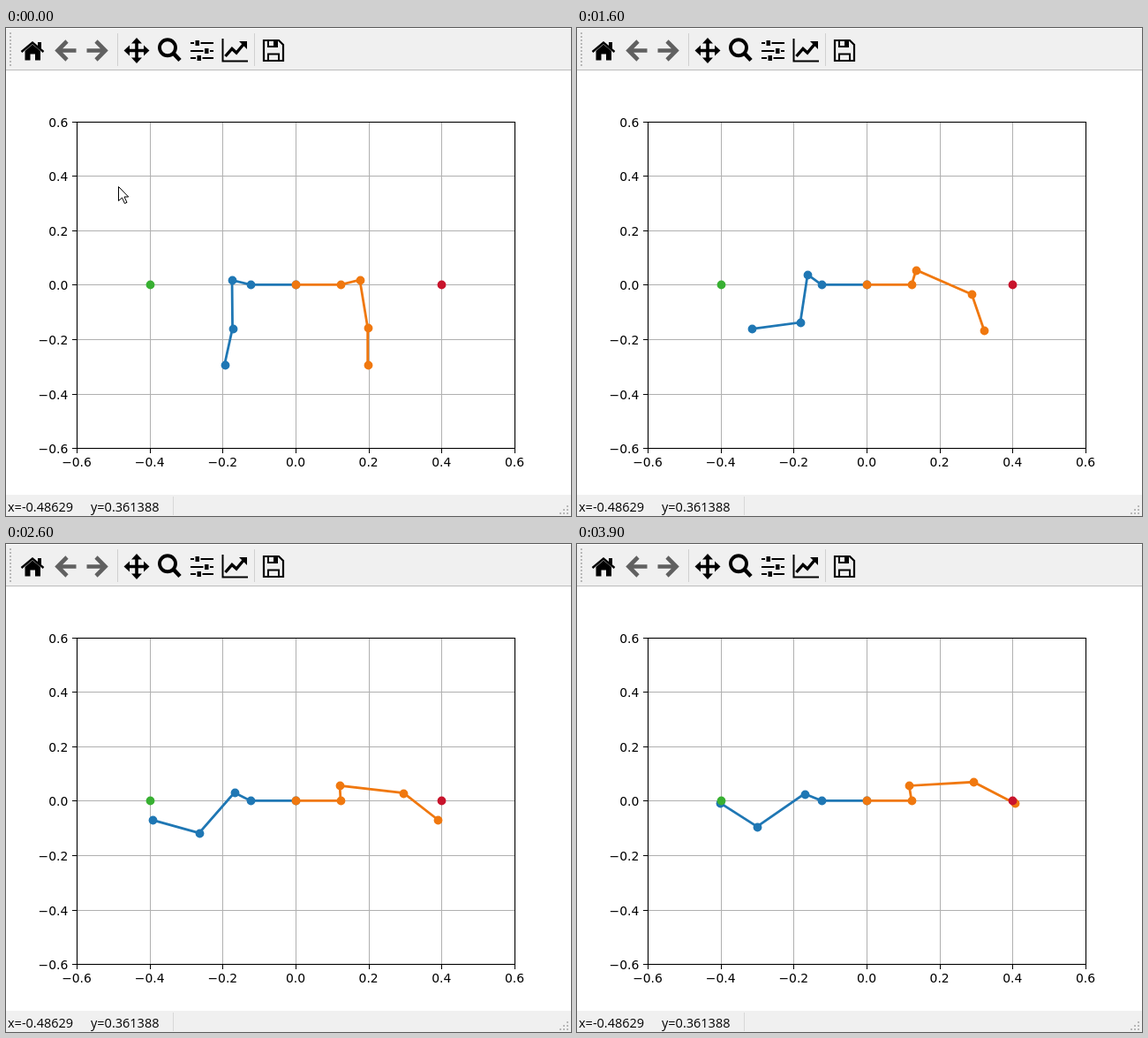
An HTML page with a canvas that plays this animation: 640x552 px, repeating every 4 s.

```html
<!DOCTYPE html>
<html lang="en">
<head>
<meta charset="utf-8">
<title>Two-leg reach plot</title>
<style>
  html, body { margin: 0; width: 640px; height: 552px; overflow: hidden; background: #fff; }
  canvas { display: block; }
</style>
</head>
<body>
<canvas id="stage" width="640" height="552"></canvas>
<script>
const ctx = document.getElementById('stage').getContext('2d');
const LOOP = 4, STEP = 0.1; // seconds
const BLUE = '#1f77b4', ORANGE = '#f0780f', GREEN = '#38b032', RED = '#c8142c';
const X = v => 328 + v * 413.33;
const Y = v => 290.4 - v * 308;

// Progress from 0 to 1: a power ease-out, and a smooth swing between two times.
const settle = (t, power, end = LOOP) => 1 - Math.max(0, 1 - t / end) ** power;
const swing = (t, start, end) => {
  const u = Math.min(1, Math.max(0, (t - start) / (end - start)));
  return u * u * (3 - 2 * u);
};

// Absolute link angles in degrees, from the hip outwards.
const legs = [
  { color: BLUE, hip: -0.1235, links: [0.0533, 0.177, 0.135], pose(t) {
    const lift = swing(t, 1, 3.5);
    return [161.6 - 28.6 * settle(t, 2, 1) + 18.5 * lift, 270.4 - 47.5 * lift, 260.7 - 121.5 * settle(t, 1.7)];
  } },
  { color: ORANGE, hip: 0.1235, links: [0.0555, 0.177, 0.1365], pose: t =>
    [18.6 + 78.5 * settle(t, 2.7), -83 + 87.5 * settle(t, 1.8), -90 + 55.4 * swing(t, 0.7, 3.4)] }
];

function rect(color, x, y, w, h) {
  ctx.fillStyle = color;
  ctx.fillRect(x, y, w, h);
}

function shape(d, fill, stroke, width = 1) {
  const path = new Path2D(d);
  if (fill) { ctx.fillStyle = fill; ctx.fill(path); }
  if (stroke) { ctx.strokeStyle = stroke; ctx.lineWidth = width; ctx.stroke(path); }
}

// Markers sit on whole pixels.
function dot(color, x, y) {
  ctx.fillStyle = color;
  ctx.beginPath();
  ctx.arc(Math.round(x) + 0.5, Math.round(y) + 0.5, 4.9, 0, 7);
  ctx.fill();
}

function text(str, x, y, font, align = 'left') {
  ctx.font = font;
  ctx.textAlign = align;
  ctx.fillStyle = '#000';
  ctx.fillText(str, x, y);
}

function drawSlider(y, knob) {
  rect('#000', 209, y - 1, 26, 2);
  rect('#f0f0f0', knob - 1.5, y - 3, 7.5, 6);
  rect('#000', knob, y - 3, 4.5, 6);
}

function drawToolbar() {
  rect('#f0f0f0', 0, 1, 640, 46);
  rect('#bcbcbc', 0, 47, 640, 1);
  for (let y = 5; y < 44; y += 4) rect('#b8b8b8', 4, y, 2, 2);
  for (const x of [126, 281]) rect('#d0d0d0', x, 6, 1, 37);

  // home
  shape('M30 18.5L39 26V36.5H33V29.5H27.5V36.5H21.5V26Z', '#000');
  shape('M17.5 27L30 16.5L42.5 27', null, '#000', 2.4);
  rect('#000', 36, 16, 4, 7);
  // back and forward
  shape('M58 25.5H79.5M69 15L58.5 25.5L69 36', null, '#606060', 4.6);
  shape('M91.5 25.5H113M102 15L112.5 25.5L102 36', null, '#606060', 4.6);
  // pan
  shape('M148 15V36M138 25.5H158', null, '#000', 3.6);
  shape('M148 11L154 17.5H142ZM148 40L142 33.5H154ZM133.5 25.5L140 19.5V31.5ZM162.5 25.5L156 19.5V31.5Z', '#000');
  // zoom
  shape('M192 22.3A9 9 0 1 1 174 22.3A9 9 0 1 1 192 22.3', null, '#000', 3.9);
  shape('M189.5 28.5L197 36.5', null, '#000', 4.6);
  // sliders
  drawSlider(17, 214.5);
  drawSlider(26, 225);
  drawSlider(34, 216.5);
  // chart
  shape('M245.5 12V37.5H274', null, '#000', 2);
  shape('M248.5 32L256 23.5L261 28L269 18.5', null, '#000', 3.4);
  shape('M264 15H273V24Z', '#000');
  // save
  shape('M292 14H309L314 19V37H292Z', null, '#000', 2.2);
  shape('M297 36.5V29.5H309V36.5M297 14V21H307V14', null, '#000', 2);
  rect('#000', 303, 14, 3, 6);
}

function drawStatus() {
  const font = '14.5px "Open Sans", sans-serif';
  rect('#f0f0f0', 0, 528, 640, 24);
  text('x=-0.48629', 2, 547, font);
  text('y=0.361388', 96, 547, font);
  rect('#d7d7d7', 189, 530, 1, 21);
  for (let row = 0; row < 3; row++)
    for (let col = 2 - row; col < 3; col++)
      rect('#b8b8b8', 627 + col * 4, 540 + row * 4, 2, 2);
}

function drawAxes() {
  const font = '13.9px "DejaVu Sans", sans-serif';
  for (let i = -3; i <= 3; i++) {
    const v = i / 5;
    const x = Math.round(X(v)), y = Math.round(Y(v));
    const label = v.toFixed(1).replace('-', '\u2212');
    if (Math.abs(i) < 3) {
      rect('#b0b0b0', x, 107, 1, 368);
      rect('#b0b0b0', 81, y, 495, 1);
    }
    rect('#000', x, 476, 1, 5);
    rect('#000', 75, y, 5, 1);
    text(label, X(v), 496, font, 'center');
    text(label, 70.3, Math.round(Y(v) + 6), font, 'right');
  }
  ctx.strokeStyle = '#000';
  ctx.lineWidth = 1.1;
  ctx.strokeRect(80.5, 106.5, 496, 369);
}

function drawLeg({ color, hip, links, pose }, t) {
  let x = hip, y = 0;
  const points = [[X(0), Y(0)], [X(hip), Y(0)]];
  pose(t).forEach((deg, i) => {
    const a = deg * Math.PI / 180;
    x += links[i] * Math.cos(a);
    y += links[i] * Math.sin(a);
    points.push([X(x), Y(y)]);
  });
  shape('M' + points.join('L'), null, color, 2.8);
  points.forEach(p => dot(color, ...p));
}

function frame(now) {
  const t = Math.floor(now / 1000 % LOOP / STEP) * STEP;
  rect('#fff', 0, 0, 640, 552);
  drawToolbar();
  drawAxes();
  legs.forEach(leg => drawLeg(leg, t));
  dot(GREEN, X(-0.4), Y(0));
  dot(RED, X(0.4), Y(0));
  drawStatus();
  if (t < STEP) shape('M127.5 179.5V195.5L131.5 192L134.5 198.5L137 197.3L134 191H138.7Z', '#fff', '#000');
  requestAnimationFrame(frame);
}
requestAnimationFrame(frame);
</script>
</body>
</html>
```
